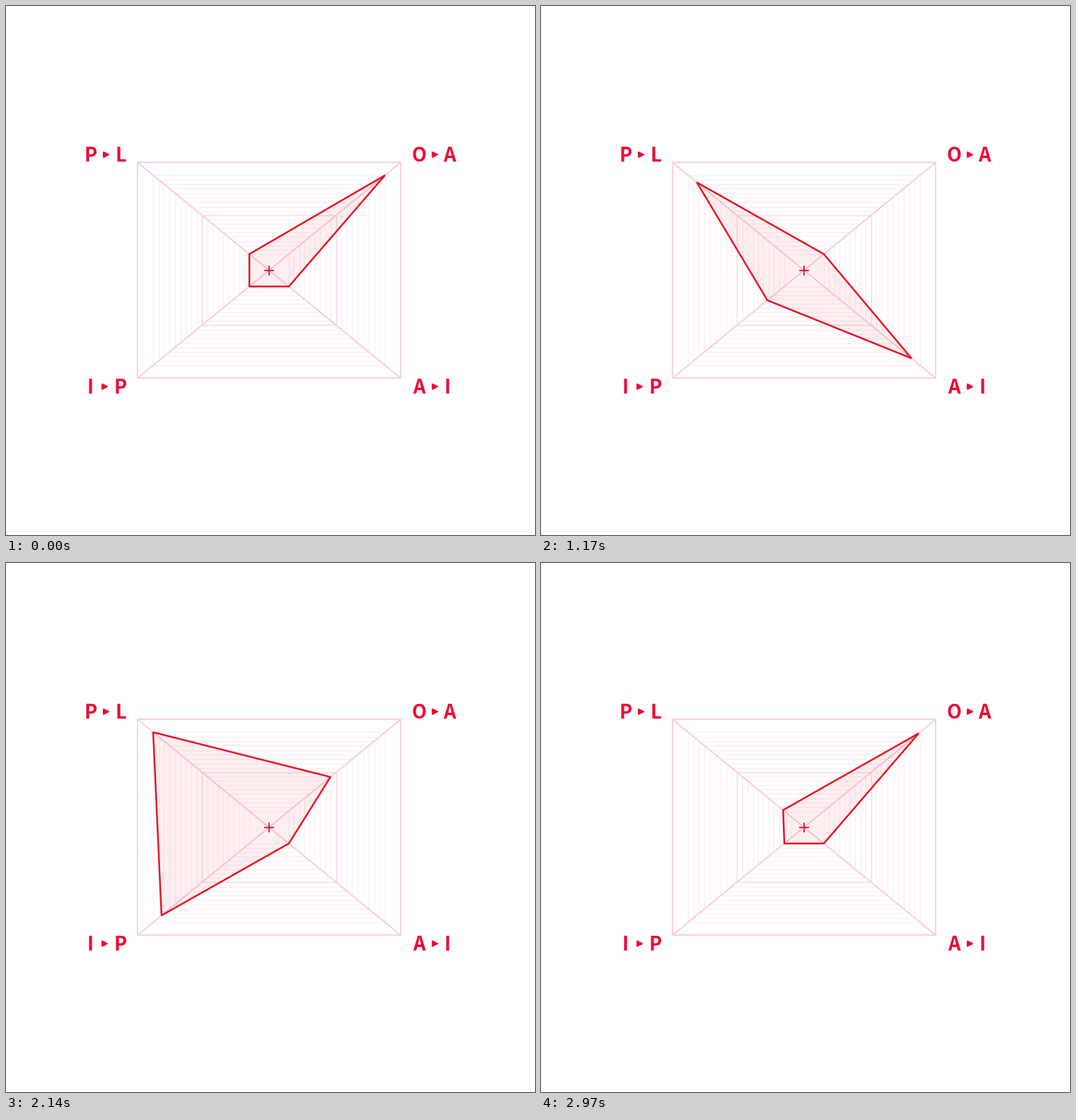
Write a matplotlib script that moves like this. It is 748 px wide and 748 px high and loops after 3000 ms.

```python
import numpy as np
import matplotlib.pyplot as plt
from matplotlib.animation import FuncAnimation
from matplotlib.patches import Polygon

SIZE, DPI, FRAMES = 748, 100, 90
PX = 72 / DPI
RED, LABEL, CROSS = "#e60f22", "#f00535", "#c9183a"
FRAME, RING, HATCH = "#f9cdd1", "#fad8db", "#fdeced"
CENTER = np.array([372, 373.7])
HALF = np.array([186.3, 152.7])
CORNERS = np.array([(-1, -1), (1, -1), (1, 1), (-1, 1)])
LOW, MID, HIGH = 0.15, 0.508, 0.88

# Per corner: resting level, then moves (start, end, level reached)
TRACKS = [
    (LOW, [(16, 31, HIGH), (30.2, 48.2, MID), (49, 62, HIGH), (75, 90, LOW)]),
    (HIGH, [(10, 29, LOW), (49, 61, MID), (61, 75, LOW), (75, 90, HIGH)]),
    (LOW, [(3, 23, HIGH), (31.7, 49.7, LOW)]),
    (LOW, [(30.2, 48.2, HIGH), (62, 73, LOW)]),
]

fig = plt.figure(figsize=(SIZE / DPI, SIZE / DPI), dpi=DPI, facecolor="white")
ax = fig.add_axes([0, 0, 1, 1])
ax.set_xlim(0, SIZE)
ax.set_ylim(SIZE, 0)
ax.axis("off")


def line(xs, ys, color, width, z):
    ax.plot(xs, ys, color=color, lw=width * PX, zorder=z,
            solid_capstyle="butt", solid_joinstyle="miter")


def ring(level, color, width, z):
    pts = CENTER + CORNERS * HALF * level
    pts = np.vstack([pts, pts[:1]])
    line(pts[:, 0], pts[:, 1], color, width, z)


def label(first, second, arrow_x, baseline):
    for char, x in (first, second):
        ax.text(x, baseline, char, color=LABEL, ha="center", va="baseline",
                family="Noto Sans CJK JP", weight="bold", size=27.3 * PX, zorder=6)
    y = baseline - 9.8
    ax.add_patch(Polygon([(arrow_x + 1, y - 3.5), (arrow_x + 8, y),
                          (arrow_x + 1, y + 3.5)], facecolor=LABEL,
                         edgecolor=LABEL, lw=2 * PX, joinstyle="round", zorder=6))


def ease(u):
    u = min(max(u, 0), 1)
    return u * u * (3 - 2 * u)


def level_at(track, t):
    level, moves = track
    for start, end, goal in moves:
        level += (goal - level) * ease((t - start) / (end - start))
    return level


def shape_at(t):
    levels = np.array([level_at(track, t) for track in TRACKS])
    return CENTER + CORNERS * HALF * levels[:, None]


for a, b in ((LOW, MID), (MID, HIGH)):
    for level in np.linspace(a, b, 10):
        ring(level, HATCH, 1.1, 1)
ring(MID, RING, 1.4, 2)
for corner in CORNERS:
    tip = CENTER + corner * HALF
    line([CENTER[0], tip[0]], [CENTER[1], tip[1]], FRAME, 1.9, 3)
ring(1, FRAME, 1.8, 3)

label(("P", 119.6), ("L", 162.3), 137, 220)
label(("O", 584), ("A", 626.5), 602, 220)
label(("I", 119), ("P", 161.4), 135, 548)
label(("A", 583.7), ("I", 623.8), 602, 548)

fill = Polygon(shape_at(0), facecolor=RED, alpha=0.065, lw=0, zorder=4)
edge = Polygon(shape_at(0), fill=False, edgecolor=RED, lw=2.4 * PX,
               joinstyle="bevel", zorder=5)
ax.add_patch(fill)
ax.add_patch(edge)
cx, cy = 371.7, 373.5
line([cx - 7, cx + 7], [cy, cy], CROSS, 1.8, 6)
line([cx, cx], [cy - 7, cy + 7], CROSS, 1.8, 6)


def draw(i):
    pts = shape_at(i)
    fill.set_xy(pts)
    edge.set_xy(pts)
    return fill, edge


anim = FuncAnimation(fig, draw, frames=FRAMES, interval=3000 / FRAMES,
                     repeat=True, repeat_delay=0, blit=False)
plt.show()
```
